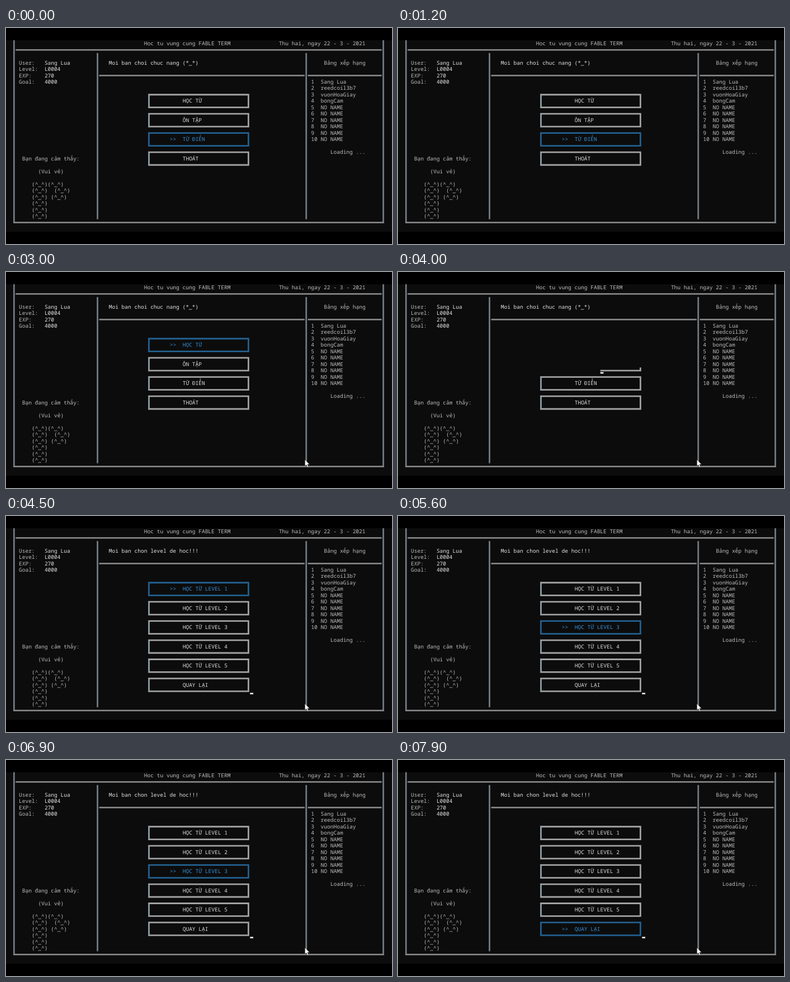
These frames come from a looping animation (690x388 px, 8 s). An HTML page:

```html
<!DOCTYPE html>
<html lang="vi">
<head>
<meta charset="utf-8">
<title>Console menu</title>
<style>
  html, body { margin: 0; width: 100%; height: 100%; overflow: hidden; background: #000; }
  svg { display: block; width: 690px; height: 388px; }
  text {
    font: 9.567px "Noto Sans Mono", "DejaVu Sans Mono", monospace;
    text-rendering: geometricPrecision;
    white-space: pre;
    fill: #bcbcbc;
  }
  text.bright { fill: #e2e2e2; }
  .rule { fill: none; stroke: #858585; stroke-width: 2.8; }
  .upright { stroke: #717a82; }
  .button .rule { stroke: #a2a2a2; }
  .button .edge { fill: none; stroke: #6390ae; stroke-width: 1; }
  .button text { fill: #dedede; }
  .button .arrow { display: none; }
  .selected text { fill: #3590d8; }
  .selected .rule, .selected .edge { stroke: #23608f; }
  .selected .arrow { display: inline; }
</style>
</head>
<body>
<svg id="stage" viewBox="0 0 690 388"></svg>
<script>
const CELL_W = 5.74, CELL_H = 11.48, LOOP = 8000;
const stage = document.getElementById('stage');

const left = col => col * CELL_W;
const midX = col => (col + 0.5) * CELL_W;
const midY = row => 27.9 + row * CELL_H;
const top_ = row => midY(row) - CELL_H / 2;

function add(parent, tag, attrs, content) {
  const node = document.createElementNS('http://www.w3.org/2000/svg', tag);
  for (const key in attrs) node.setAttribute(key, attrs[key]);
  if (content !== undefined) node.textContent = content;
  return parent.appendChild(node);
}

function write(parent, col, row, content, cls = '') {
  return add(parent, 'text', { x: left(col), y: midY(row) + 3.2, class: cls }, content);
}

const path = (parent, d, cls = 'rule') => add(parent, 'path', { d, class: cls });
const show = (node, on) => { node.style.display = on ? '' : 'none'; };

const ruleRow = (row, from, to) => path(stage, `M${left(from)} ${midY(row)}H${left(to)}`);
const ruleColumn = (col, y1, y2) => path(stage, `M${midX(col)} ${y1}V${y2}`, 'rule upright');

function button(parent, label, index) {
  const row = 9 + index * 3;
  const group = add(parent, 'g', { class: 'button' });
  const x1 = midX(44), x2 = midX(75), y1 = midY(row - 1), y2 = midY(row + 1);
  path(group, `M${x1} ${y1}H${x2}V${y2}H${x1}Z`);
  path(group, `M${x1 - 0.9} ${y1}V${y2}`, 'edge');
  write(group, 51, row, '>>', 'arrow');
  write(group, 55, row, label);
  return group;
}

function menu(heading, labels) {
  const group = add(stage, 'g', {});
  return {
    group,
    heading: write(stage, 32, 3, heading, 'bright'),
    buttons: labels.map((label, i) => button(group, label, i))
  };
}

// Console background and frame
add(stage, 'rect', { width: 690, height: 388, fill: '#000' });
add(stage, 'rect', { y: 22, width: 690, height: 344, fill: '#0c0c0c' });
ruleColumn(2, 22, midY(28));
ruleColumn(117, 22, midY(28));
ruleColumn(28, top_(2), top_(28));
ruleColumn(93, top_(2), top_(28));
ruleRow(1, 3, 117);
ruleRow(5, 29, 93);
ruleRow(5, 94, 117);
ruleRow(28, 2.25, 117.75);

// Fixed text
write(stage, 43, 0, 'Hoc tu vung cung FABLE TERM');
write(stage, 85, 0, 'Thu hai, ngay 22 - 3 - 2021');
[['User:', 'Sang Lua'], ['Level:', 'L0004'], ['EXP:', '270'], ['Goal:', '4000']]
  .forEach(([key, value], i) => {
    write(stage, 4, 3 + i, key);
    write(stage, 12, 3 + i, value, 'bright');
  });
write(stage, 5, 18, 'Bạn đang cảm thấy:');
write(stage, 10, 20, '(Vui vẻ)');
const face = '(^_^)';
[face + face, face + '  ' + face, face + ' ' + face, face, face, face]
  .forEach((line, i) => write(stage, 8, 22 + i, line));
write(stage, 99, 3, 'Bảng xếp hạng');
const players = ['Sang Lua', 'reedcoil3b7', 'vuonHoaGiay', 'bongCam'];
for (let i = 0; i < 10; i++) {
  write(stage, 95, 6 + i, String(i + 1));
  write(stage, 98, 6 + i, players[i] || 'NO NAME');
}
write(stage, 101, 17, 'Loading ...');

const menus = [
  menu('Moi ban choi chuc nang (*_*)', ['HỌC TỪ', 'ÔN TẬP', 'TỪ ĐIỂN', 'THOÁT']),
  menu('Moi ban chon level de hoc!!!',
    [1, 2, 3, 4, 5].map(n => 'HỌC TỪ LEVEL ' + n).concat('QUAY LẠI'))
];

// Cells already cleared while the first menu is wiped
const wipe = path(stage, `M${left(43)} ${top_(7)}H${left(77)}V${top_(13)}H${left(63)}V${top_(14)}H${left(43)}Z`, '');
wipe.setAttribute('fill', '#0c0c0c');

const caret = add(stage, 'rect', { width: 5.8, height: 2.6, fill: '#f2f2f2' });
const pointer = add(stage, 'path', {
  d: 'M0 0V11.8L2.7 9.4L4.7 14L6.7 13.1L4.7 8.7H8.4Z',
  fill: '#fff', stroke: '#111', 'stroke-width': 0.5
});

// time, menu, selected, buttons drawn, caret [col, row]
const HOME = [76, 19], END = [76, 25];
const steps = [
  [0, 0, 2, 4, null],
  [1900, 0, 2, 4, HOME],
  [2400, 0, 2, 4, null],
  [2600, 0, 3, 4, null],
  [3000, 0, 0, 4, null],
  [4000, 0, 0, 4, [63, 13]],
  [4100, 1, 0, 0, null],
  [4200, 1, 0, 3, null],
  [4300, 1, 0, 6, END]
];
// Each key press hides the caret until the repaint is done
[[5000, 1], [5400, 2, 200], [5800, 3], [6100, 4], [6500, 3], [6800, 2], [7100, 1], [7500, 0], [7800, 5]]
  .forEach(([time, selected, repaint = 100]) => steps.push(
    [time, 1, selected, 6, null],
    [time + repaint, 1, selected, 6, END]
  ));

function render(t) {
  const [time, current, selected, drawn, cell] = steps.filter(step => step[0] <= t).pop();
  menus.forEach((item, m) => {
    show(item.group, m === current);
    show(item.heading, m === current);
    item.buttons.forEach((node, i) => {
      show(node, i < drawn);
      node.classList.toggle('selected', i === selected);
    });
  });
  show(wipe, time === 4000);
  show(caret, cell);
  if (cell) {
    caret.setAttribute('x', left(cell[0]));
    caret.setAttribute('y', top_(cell[1] + 1) - 3);
  }
  show(pointer, t >= 1800);
  pointer.setAttribute('transform', `translate(534.3 ${t < 1900 ? 341 : 337})`);
}

const start = performance.now();
function tick() {
  render((performance.now() - start) % LOOP);
  requestAnimationFrame(tick);
}
tick();
</script>
</body>
</html>
```
